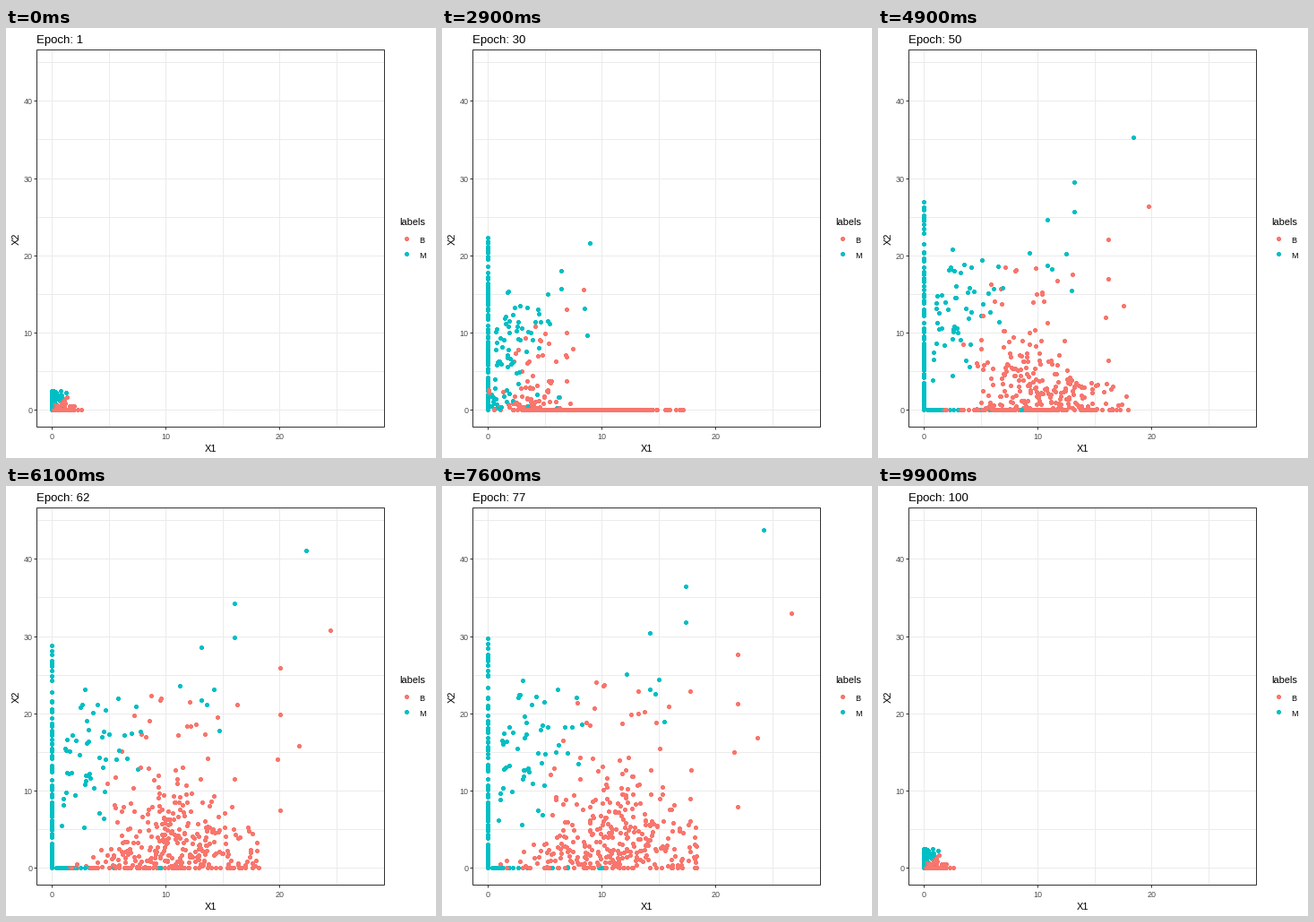
Recreate the animation shown at these times as a matplotlib script. Size 480 by 480 pixels, loop 10 s.

```python
import numpy as np
import matplotlib.pyplot as plt
from matplotlib.animation import FuncAnimation
from matplotlib.patches import Rectangle

SIZE, DPI, FRAMES = 480, 100, 100
PT = 72 / DPI
RED, TEAL = "#F8766D", "#00BFC4"
GRID, DARK, GREY = "#EBEBEB", "#333333", "#4D4D4D"
LEFT, RIGHT, TOP, BOTTOM = 34.5, 422.5, 24.5, 445.5
plt.rcParams["font.family"] = "Liberation Sans"
rng = np.random.default_rng(11)


def to_px(x, y):
    """Data to the centre of the nearest pixel."""
    return (np.floor(51.4 + 12.72 * x) + 0.5,
            np.floor(426.6 - 8.62 * y) + 0.5)


# Every group returns three poses: start, middle (axis-bound) and end.
# Negative values are cut to zero when drawn.
def poses(*pairs):
    return np.array([np.column_stack(p) for p in pairs])


def far(points, fx, fy):
    x, y = np.array(points).T
    return poses((0.05 * x, 0.05 * y), (fx * x, fy * y), (x, y))


def benign(n):
    z = np.clip(rng.normal(size=n), -2.1, 2.1)
    w = np.clip(0.55 * z + 0.9 * rng.normal(size=n), -2.6, 1.85)
    g = rng.gamma(1.5, size=n) * np.clip((w + 2.6) / 2, 0.25, 1.1)
    x0 = np.minimum(0.1 + rng.exponential(0.5, n), 3.2)
    y0 = np.where(rng.random(n) < 0.08, rng.uniform(0.1, 0.7, n), 0)
    x1 = np.where(g > 2.3, rng.normal(1.4, 1.6, n), 9 + 3.7 * z)
    return poses((x0, y0), (x1, 1.5 * g - 6), (11 + 4 * w, 3.6 * g - 0.8))


def wall(n):
    q = np.append(rng.random(n - 1), 1)
    x = np.zeros(n)
    return poses((x, 2.5 * q**3), (x, 20 * q**1.6), (x, 30 * q**2.5))


def floor_row(n):
    x = 0.4 + rng.exponential(2, n)
    y = rng.uniform(0, 4, n)
    return poses((0.08 * x, 0.1 * y), (0.5 * x, y), (x, -y))


def loose(n):
    x = 0.3 + rng.gamma(2.2, 2, n)
    y = np.abs(11.5 + 0.8 * x + rng.normal(0, 4.5, n))
    y1 = 0.45 * y + rng.normal(0, 2, n)
    return poses((0.05 * x, 0.1 * y), (0.42 * x, y1), (x, y))


far_m = [(24.8, 44.6), (17.8, 37.2), (17.8, 32.4), (14.6, 31),
         (12.5, 25.6), (14.6, 23.6), (15.1, 23)]
far_b = [(27.4, 33.6), (22.5, 28.2), (22.5, 21.7), (24.3, 17.2),
         (22.2, 15.3), (16.3, 21.3), (13.6, 23.4), (22.5, 8.1)]
groups = [far(far_b, 0.1, 0.3), benign(349),
          far(far_m, 0.17, 0.33), wall(130), floor_row(21), loose(54)]
paths = np.concatenate(groups, axis=1)
colors = np.array([RED] * 357 + [TEAL] * 212)
order = rng.permutation(len(colors))
start, middle, end = paths[:, order]
colors = colors[order]


def positions(epoch):
    spread = 1 - np.exp(-(epoch - 1) / 4)
    lift = spread / (1 + np.exp((42 - epoch) / 10))
    p = start + (middle - start) * spread + (end - middle) * lift
    return np.column_stack(to_px(*np.maximum(p, 0).T))


fig = plt.figure(figsize=(SIZE / DPI, SIZE / DPI), dpi=DPI, facecolor="white")
ax = fig.add_axes([0, 0, 1, 1])
ax.set(xlim=(0, SIZE), ylim=(SIZE, 0))
ax.axis("off")


def line(xs, ys, color):
    ax.plot(xs, ys, color=color, lw=PT, zorder=1, solid_capstyle="butt",
            snap=False)


def text(x, y, s, px, color="black", **kw):
    return ax.text(x, y, s, fontsize=px * PT, color=color, **kw)


def dots(xy, c):
    return ax.scatter(xy[:, 0], xy[:, 1], s=(4.3 * PT) ** 2, c=c,
                      linewidths=0, antialiased=False, zorder=4)


for v in range(0, 30, 5):
    px = to_px(v, 0)[0]
    line([px, px], [TOP, BOTTOM], GRID)
    if v % 10 == 0:
        line([px, px], [BOTTOM, BOTTOM + 3], DARK)
        text(px, 459, v, 9, GREY, ha="center")
for v in range(0, 50, 5):
    py = to_px(0, v)[1]
    line([LEFT, RIGHT], [py, py], GRID)
    if v % 10 == 0:
        line([LEFT - 3, LEFT], [py, py], DARK)
        text(29.5, py + 3.5, v, 9, GREY, ha="right")
ax.add_patch(Rectangle((LEFT, TOP), RIGHT - LEFT, BOTTOM - TOP, fill=False,
                       ec=DARK, lw=PT, zorder=5, snap=False))

text(228, 473, "X1", 11, ha="center")
text(17, 235.5, "X2", 11, rotation=90, ha="right", va="center")
text(439, 220, "labels", 11)
text(461.5, 240, "B", 9)
text(461.5, 257, "M", 9)
dots(np.array([[447.5, 235.5], [447.5, 252.5]]), [RED, TEAL])

title = text(33.5, 17, "Epoch: 1", 13.2)
cloud = dots(positions(1), colors)


def update(i):
    epoch = i + 1
    title.set_text(f"Epoch: {epoch}")
    cloud.set_offsets(positions(epoch if epoch < FRAMES else 1))
    return title, cloud


anim = FuncAnimation(fig, update, frames=FRAMES, interval=100, repeat=True)
plt.show()
```
